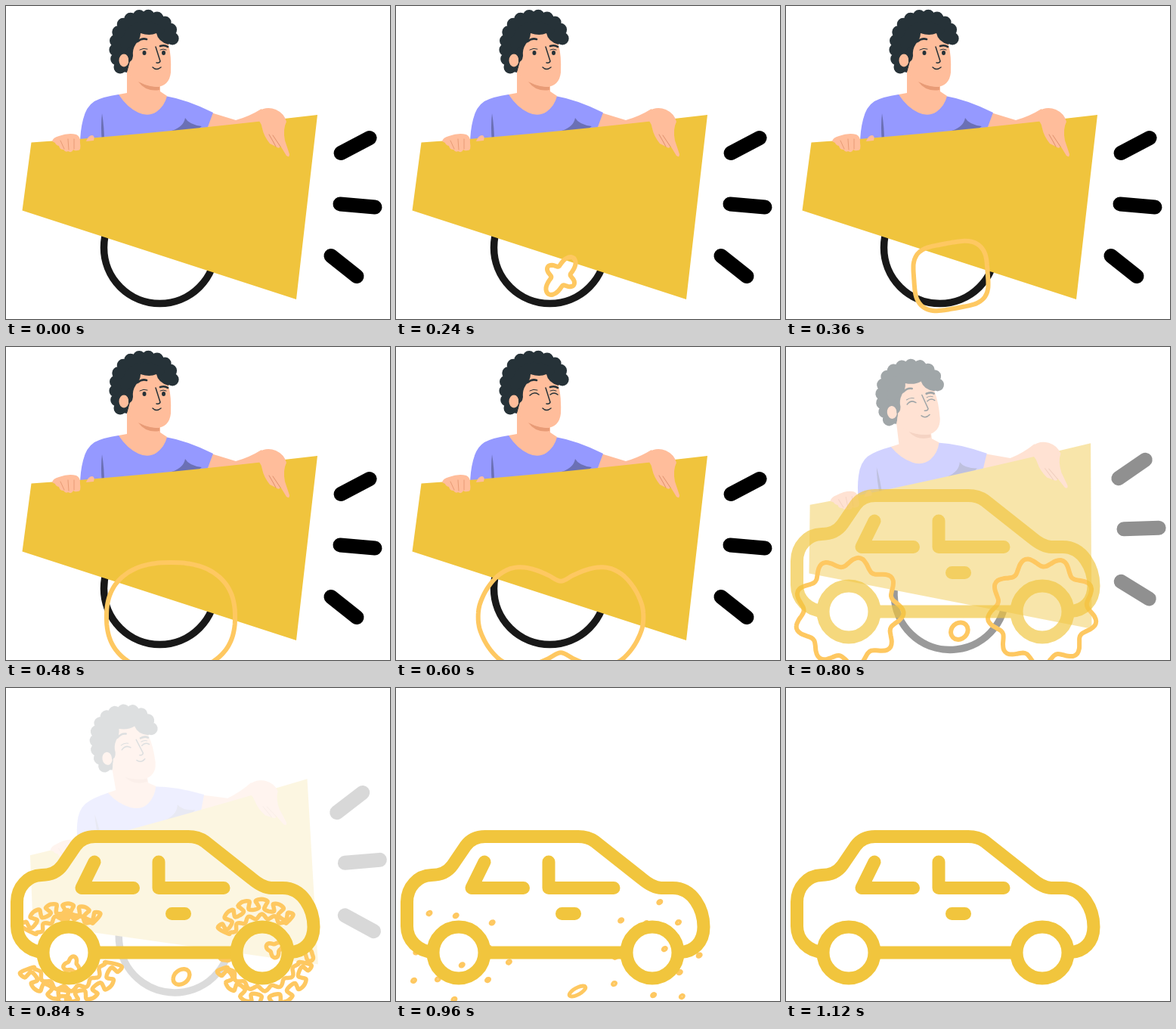
Animation of 508 by 414 pixels, one loop 1.4 s. Source, as an HTML page:

```html
<!DOCTYPE html>
<html lang="en">
<head>
<meta charset="utf-8">
<title>Megaphone to car</title>
<style>
  html, body { margin: 0; width: 100%; height: 100%; overflow: hidden; background: #fff; }
  svg { display: block; width: 508px; height: 414px; }
  .line { fill: none; stroke-linecap: round; stroke-linejoin: round; }
  .skin { fill: #ffbd9b; }
  .hair { fill: #263238; }
  .ink { stroke: #263238; }
  .curls { stroke-width: 17; stroke-dasharray: 0 12; }
</style>
</head>
<body>
<svg viewBox="0 0 508 414">
  <g id="man">
    <circle class="line" cx="203.5" cy="319.5" r="74" stroke="#181818" stroke-width="9.5"/>
    <path class="skin" d="M268 140L304 151Q322 146 338 136L345 158L262 166Z"/>
    <path fill="#9599ff" d="M149 117Q128 120 117 126Q106 133 102 150Q98 165 98 184L264 168L274 141Q240 124 211 119Z"/>
    <path fill="#6b70b5" d="M127 142Q130 160 130 180L127 180Q125 160 127 142Z"/>
    <path fill="#6b70b5" d="M219 165Q235 160 237 148Q242 157 259 159L250 166Z"/>
    <path class="skin" d="M160 80L160 115L149 117Q160 134 175 141Q188 147 199 140Q210 132 213 119L204 113L204 95Z"/>
    <path fill="#e89b76" d="M175 100Q189 107 203 107L203 111Q185 114 175 100Z"/>
    <path class="hair" d="M151 86C140 62 140 14 183 13C206 13 222 28 220 46L206 52L168 62L160 88Z"/>
    <path class="line ink curls" d="M151 81C140 62 140 14 183 13C206 13 222 28 220 45L209 44"/>
    <path class="skin" d="M160 89L165 69Q165 58 170 52Q178 45 178 36Q190 40 199 36Q201 47 215 51Q219 66 218 88Q216 106 199 107Q182 106 170 96Z"/>
    <ellipse class="skin" cx="156" cy="72" rx="6.500" ry="8.500"/>
    <path class="hair" d="M161 56L172 50Q167 57 168 66Q167 74 162 74Q163 66 158 62Z"/>
    <g class="line ink" stroke-width="1.5">
      <path d="M174 47Q180 42 186 44M204 53Q210 51 214 54" stroke-width="2.6"/>
      <path d="M198 54L204 73Q203 76 199 75M194 81Q199 86 205 81"/>
      <path d="M177 58Q182 55 187 57M204 58Q208 56 212 58" stroke-width="1"/>
      <path id="shut" d="M177 64Q183 58 189 63M204 63Q209 59 214 63"/>
    </g>
    <g id="open" class="hair">
      <ellipse cx="183" cy="62" rx="2.5" ry="3"/>
      <ellipse cx="208.5" cy="62" rx="2.5" ry="3"/>
    </g>
    <path fill="#f0c43d" d="M33.5 180.5Q170 172 412 144L384 388L21.5 270.5Z"/>
    <path class="skin" d="M106 179Q109 171 114 171Q118 172 116 178Z"/>
    <path class="skin" d="M61 179Q62 174 70 172Q83 167 93 170Q99 173 98 181Q100 192 94 191Q91 192 89 190Q87 195 82 192Q79 194 76 190Q71 190 70 185Q66 184 65 181Z"/>
    <path class="line" stroke="#e89b76" stroke-width="1" d="M72 178L77 189M82 176L83 190M90 176L90 189"/>
    <path class="skin" d="M334 139Q345 132 357 137Q368 142 371 153Q366 163 369 178L375 196Q375 201 371 198L363 185Q362 190 357 186L349 182Q341 172 339 162Q338 156 335 152Z"/>
    <path class="line" stroke="#df906d" stroke-width="1" d="M348 170Q354 180 357 186M353 171L363 186"/>
    <path class="line" stroke="#000" stroke-width="19" d="M443 194.5L481 174.5M442 262L488 266M430 330.5L464 357.5"/>
  </g>
  <path id="goo" class="line" stroke="#fec861"/>
  <g id="car" fill="none" stroke="#f1c53d" stroke-width="17" stroke-linejoin="round">
    <path d="M50 349.5C29 349 14.5 333 14.5 315V283C14.5 263 29 248 47 247.5C59 247.5 68 244 75 234L92 209Q101 196.5 118 196.5H241Q254 196.5 263 203L325 252Q340 264.5 351 264.5H366C393 264.5 407 293 407 316C407 336 394 349 376 349.5M120 350H302"/>
    <circle cx="83" cy="350" r="34"/>
    <circle cx="339" cy="350" r="34"/>
    <path stroke-linecap="round" d="M117 230L100 264.5H168.5M202 230V264.5H288M219.5 298.5H236.5"/>
  </g>
</svg>
<script>
const LOOP = 1400, STEP = 40, TAU = Math.PI * 2;
const WHEELS = [83, 339], AXLE = 350;
const { sin, cos, abs, sign, min, max, pow, sqrt, floor } = Math;
const $ = id => document.getElementById(id);
const mix = (a, b, k) => a + (b - a) * k;
const part = (t, a, b) => max(0, min(1, (t - a) / (b - a)));
const around = (n, f) => Array.from({ length: n }, (_, i) => f(i * TAU / n));

// Closed Catmull-Rom curve
function loop(p) {
  const n = p.length, at = i => p[(i + n) % n], f = v => v.toFixed(1);
  let d = "M" + p[0].map(f).join(" ");
  for (let i = 0; i < n; i++) {
    const [a, b, c, e] = [at(i - 1), at(i), at(i + 1), at(i + 2)];
    d += "C" + [b[0] + (c[0] - a[0]) / 6, b[1] + (c[1] - a[1]) / 6,
      c[0] - (e[0] - b[0]) / 6, c[1] - (e[1] - b[1]) / 6, c[0], c[1]].map(f).join(" ");
  }
  return d + "Z";
}

// Stages of the growing outline, as points around its centre
const soft = v => sign(v) * pow(abs(v), .85);
const polar = (r, a) => [r * cos(a), r * sin(a)];
const dot = u => polar(1, u);
const star = u => polar(19 + 6 * cos(4 * (u + .96)) + 4 * cos(2 * (u + .96)), u);
const round = u => [85 * soft(cos(u)), 72 * soft(sin(u))];
const twin = u => [139 * sin(cos(u) * TAU / 4), sin(u) * (17 + 54 * sin(3.4 * abs(cos(u))))];

const morph = (from, to, k) => loop(around(64, u => {
  const [a, b] = [from(u), to(u)];
  return [218 + mix(a[0], b[0], k), 357 + mix(a[1], b[1], k)];
}));

function oval(x, y, rx, ry, tilt) {
  const c = cos(tilt), s = sin(tilt);
  return loop(around(10, u => {
    const [px, py] = [rx * cos(u), ry * sin(u)];
    return [x + px * c - py * s, y + px * s + py * c];
  }));
}

function lobed(x, y, r, lobes, amp) {
  return loop(around(lobes * 8, u => {
    const [px, py] = polar(r * (1 + amp * sin(lobes * u + x)), u);
    return [x + px, y + py];
  }));
}

// Crescent with bulging lobes along a wheel
function crescent(x, start, span, waves = 5) {
  const outer = [], inner = [], n = waves * 8;
  for (let i = 0; i <= n; i++) {
    const phase = i / n * waves * TAU;
    const put = (r, a) => {
      const [px, py] = polar(r, a);
      return [x + px, AXLE + py];
    };
    const a = start + span * i / n;
    outer.push(put(61 + 7 * cos(phase) + 4 * sin(i / 9 + x), a + .07 * sin(2 * phase)));
    inner.unshift(put(48 + 3 * cos(phase), a));
  }
  return loop(outer.concat(inner));
}

// Droplets spiral out from each wheel
const specks = WHEELS.flatMap(x => Array.from({ length: 12 }, (_, i) => {
  const [px, py] = polar(17 + 16 * sqrt(i), i * 2.4 + x);
  return [x + px, AXLE + py, i];
}));

function splash(t) {
  if (t < STEP || t >= 1120) return ["", 0];
  if (t < 240) return [morph(dot, star, part(t, 0, 240)), mix(3, 6, part(t, 40, 200))];
  if (t < 480) return [morph(star, round, part(t, 240, 480)), 6];
  if (t < 800) return [morph(round, twin, pow((t - 480) / 240, 1.15)), 6];

  const fall = (t - 840) / 120, fade = 1 - part(t, 960, 1120);
  const big = oval(mix(232, 240, fall), mix(382, 401, fall), 12 * fade, mix(9, 4.5, fall) * fade, mix(-.7, -.5, fall));
  if (t < 840) return [WHEELS.map(x => lobed(x, AXLE, 66, 9, .1)).join("") + big, 6];
  if (t < 880) {
    const arcs = WHEELS.map(x => crescent(x, 3.65, 1.75) + crescent(x, .25, 2.5, 6));
    const drops = specks.filter(([, , i]) => i % 4 == 0).map(([x, y, i]) => lobed(x, y, i ? 6 : 9, i ? 2 : 3, .3));
    return [arcs.concat(drops, big).join(""), 5.5];
  }
  const size = mix(9, 4.7, part(t, 880, 960)) * fade;
  const width = min(5, size * 1.3), r = size - width / 2;
  return [specks.map(([x, y]) => oval(x, y, r, r * .6, -.6)).join("") + big, width];
}

function draw(now) {
  const t = floor((now % LOOP) / STEP) * STEP;
  const turn = -9.9 * pow(max(0, t - 600) / 240, 2);
  $("man").setAttribute("transform", `rotate(${turn} 268 210)`);
  $("man").setAttribute("opacity", 1 - part(t, 720, 861));
  $("car").setAttribute("opacity", part(t, 720, 840));
  $("open").style.display = t < 560 ? "" : "none";
  $("shut").style.display = t < 560 ? "none" : "";
  const [d, width] = splash(t);
  $("goo").setAttribute("d", d);
  $("goo").setAttribute("stroke-width", width);
}

function tick() {
  draw(performance.now());
  requestAnimationFrame(tick);
}
tick();
</script>
</body>
</html>
```
